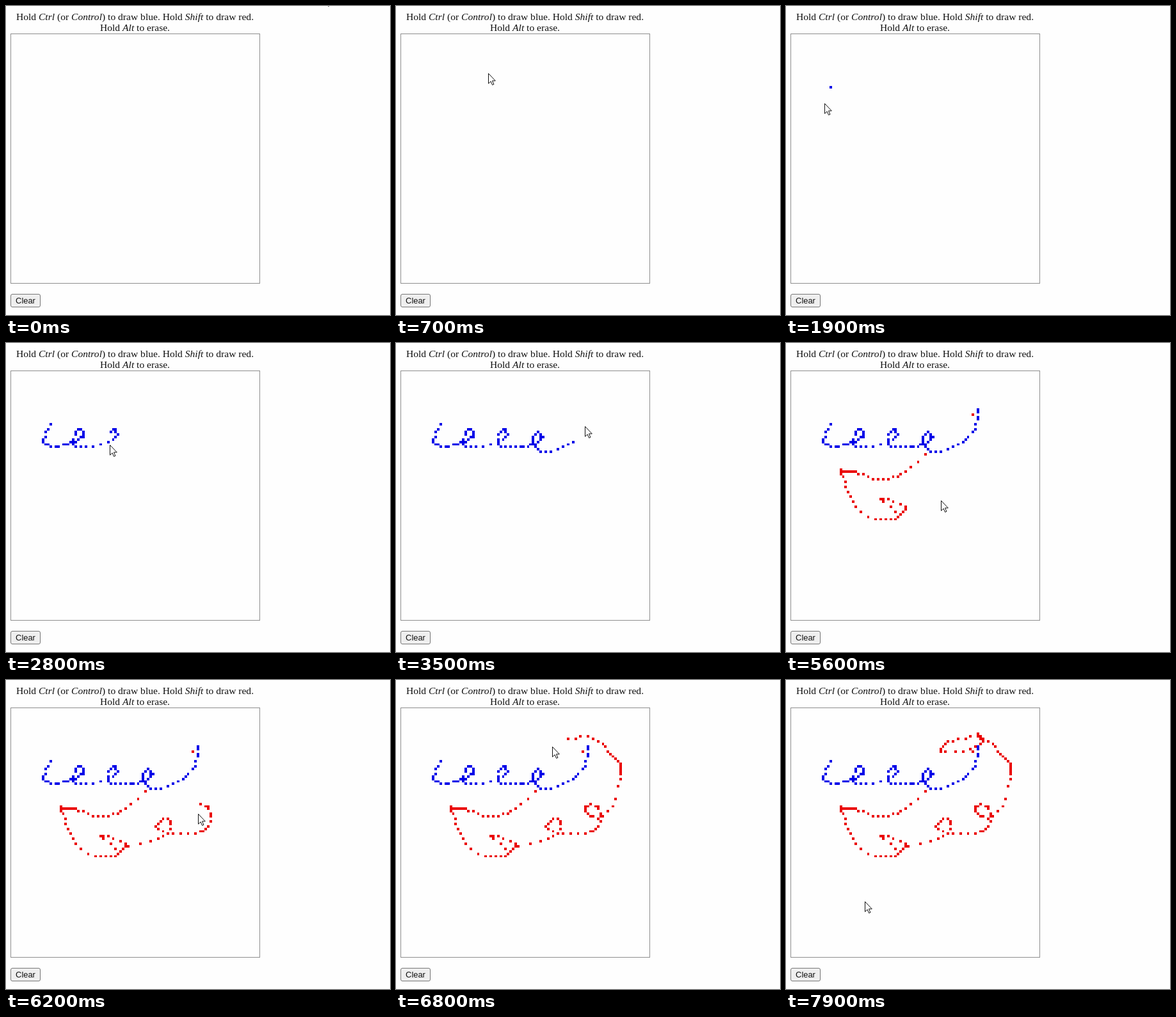
These frames come from a looping animation (600x483 px, 8000 ms). An HTML page with a canvas:

```html
<!DOCTYPE html>
<html lang="en">
<head>
<meta charset="utf-8">
<title>Modifier key drawing</title>
<style>
  html, body { margin: 0; width: 100%; height: 100%; overflow: hidden; background: #fefefe; }
  body > * { position: absolute; box-sizing: border-box; }
  p {
    left: 7px; top: 7.5px; width: 389px; margin: 0; text-align: center; white-space: nowrap;
    font: 15.58px/17.5px "Liberation Serif", "Times New Roman", serif; color: #111;
  }
  .board { left: 7px; top: 43px; width: 390px; height: 391px; border: 1px solid #8e8e8e; }
  .button {
    left: 7px; top: 450px; width: 47px; height: 21px; text-align: center;
    border: 1px solid #767676; border-radius: 3px; background: #efefef; color: #111;
    font: 12.93px/19px "Liberation Sans", Arial, sans-serif;
  }
  canvas { left: 0; top: 0; }
</style>
</head>
<body>
<p>Hold <i>Ctrl</i> (or <i>Control</i>) to draw blue. Hold <i>Shift</i> to draw red.<br>Hold <i>Alt</i> to erase.</p>
<div class="board"></div>
<div class="button">Clear</div>
<canvas width="600" height="483"></canvas>
<script>
const LOOP = 8000, STEP = 100, LEAD = 85;
const CELL = 3.9, LEFT = 5.65, TOP = 43.4, PER_KEY = 3;
const BLUE = '#0000e8', RED = '#ea0000';

const ctx = document.querySelector('canvas').getContext('2d');
const arrow = new Path2D('M.5 .5V16.2L4.1 12.8 6.6 18.4 8.9 17.4 6.5 11.9H11.3Z');
const dots = [];
const track = [];   // pointer positions over time

const px = column => LEFT + column * CELL;
const py = row => TOP + row * CELL;
const moveTo = (t, x, y) => track.push({ t, x, y });
const hold = t => track.push({ ...track[track.length - 1], t });

// Catmull-Rom curve through the keys; u counts keys.
function spline(keys, u) {
  const last = keys.length - 1, i = Math.min(Math.floor(u), last - 1), f = u - i;
  const b = keys[i], c = keys[i + 1];
  const a = keys[i - 1] || b.map((v, k) => 2 * v - c[k]);
  const d = keys[i + 2] || c.map((v, k) => 2 * v - b[k]);
  return b.map((v, k) => v + f / 2 * (c[k] - a[k] +
    f * (2 * a[k] - 5 * v + 4 * c[k] - d[k] + f * (3 * (v - c[k]) + d[k] - a[k]))));
}

// The pointer takes equal time between keys and leaves evenly timed dots on the grid.
function stroke(color, start, end, keys) {
  const count = (keys.length - 1) * PER_KEY;
  for (let i = 0; i <= count; i++) {
    const [x, y] = spline(keys, i / PER_KEY), t = start + (end - start) * i / count;
    dots.push({ t, color, x: Math.round(x), y: Math.round(y) });
    moveTo(t - LEAD, px(x + .5), py(y + .5));
  }
}

const letter = (x, y) =>
  [[2.3, 4], [4, 1.8], [2, 0], [.2, 3.5], [1, 6.5]].map(([dx, dy]) => [x + dx, y + dy]);

moveTo(200, 497, -18);
moveTo(800, 73, 129);
hold(1800);

stroke(BLUE, 1900, 3700, [
  [16, 21], [13.6, 26], [13.8, 28.8], [18, 30], [22, 29], [25.3, 28],
  ...letter(25, 23), [33, 30], ...letter(38.8, 23), [46, 30], [51, 30], ...letter(52.7, 23.8),
  [58, 32], [65, 30.3], [70, 27], [73.5, 22.5], [75, 17.5], [75, 15]
]);
hold(4400);

dots.push({ t: 4500, color: RED, x: 73, y: 17 });
stroke(RED, 4560, 5600, [
  [54, 33], [46, 40], [41, 42], [35, 43], [29, 41], [25, 40], [22, 40], [20, 39.4], [21, 42],
  [23, 48], [26, 54], [34, 59], [40, 59], [44, 57], [46, 54], [39, 51], [36, 51], [42, 56]
]);
stroke(RED, 5600, 6800, [
  [42, 56], [56, 53.3], [63, 49.5], [64, 44.5], [60, 45], [59, 48], [68, 50], [76, 49.3], [79, 47],
  [80, 41.5], [77.5, 38.6], [74, 39.3], [75, 42], [79, 43.5], [85, 39], [88, 28], [88, 23.5],
  [87, 21], [83.5, 18], [81, 14], [75, 11], [67, 12]
]);
stroke(RED, 6800, 7180, [[67, 12], [62, 14], [60, 17], [69, 17], [76, 14], [76, 11.5], [75, 10]]);
hold(7700);
moveTo(7900, 123, 346);

function pointerAt(t) {
  const i = track.findIndex(k => k.t > t);
  if (i === 0) return track[0];
  if (i < 0) return track[track.length - 1];
  const a = track[i - 1], b = track[i], f = (t - a.t) / (b.t - a.t);
  return { x: a.x + (b.x - a.x) * f, y: a.y + (b.y - a.y) * f };
}

function draw(t) {
  ctx.clearRect(0, 0, 600, 483);
  for (const d of dots) {
    if (d.t > t + .5) break;
    const x = Math.round(px(d.x)), y = Math.round(py(d.y));
    ctx.fillStyle = d.color;
    ctx.fillRect(x, y, Math.round(px(d.x + 1)) - x, Math.round(py(d.y + 1)) - y);
  }
  const p = pointerAt(t);
  ctx.save();
  ctx.translate(Math.round(p.x), Math.round(p.y));
  ctx.fillStyle = '#fff';
  ctx.strokeStyle = '#111';
  ctx.fill(arrow);
  ctx.stroke(arrow);
  ctx.restore();
}

let origin;
function tick(now) {
  origin ??= now;
  draw(Math.floor((now - origin) % LOOP / STEP) * STEP);
  requestAnimationFrame(tick);
}
draw(0);
requestAnimationFrame(tick);
</script>
</body>
</html>
```
